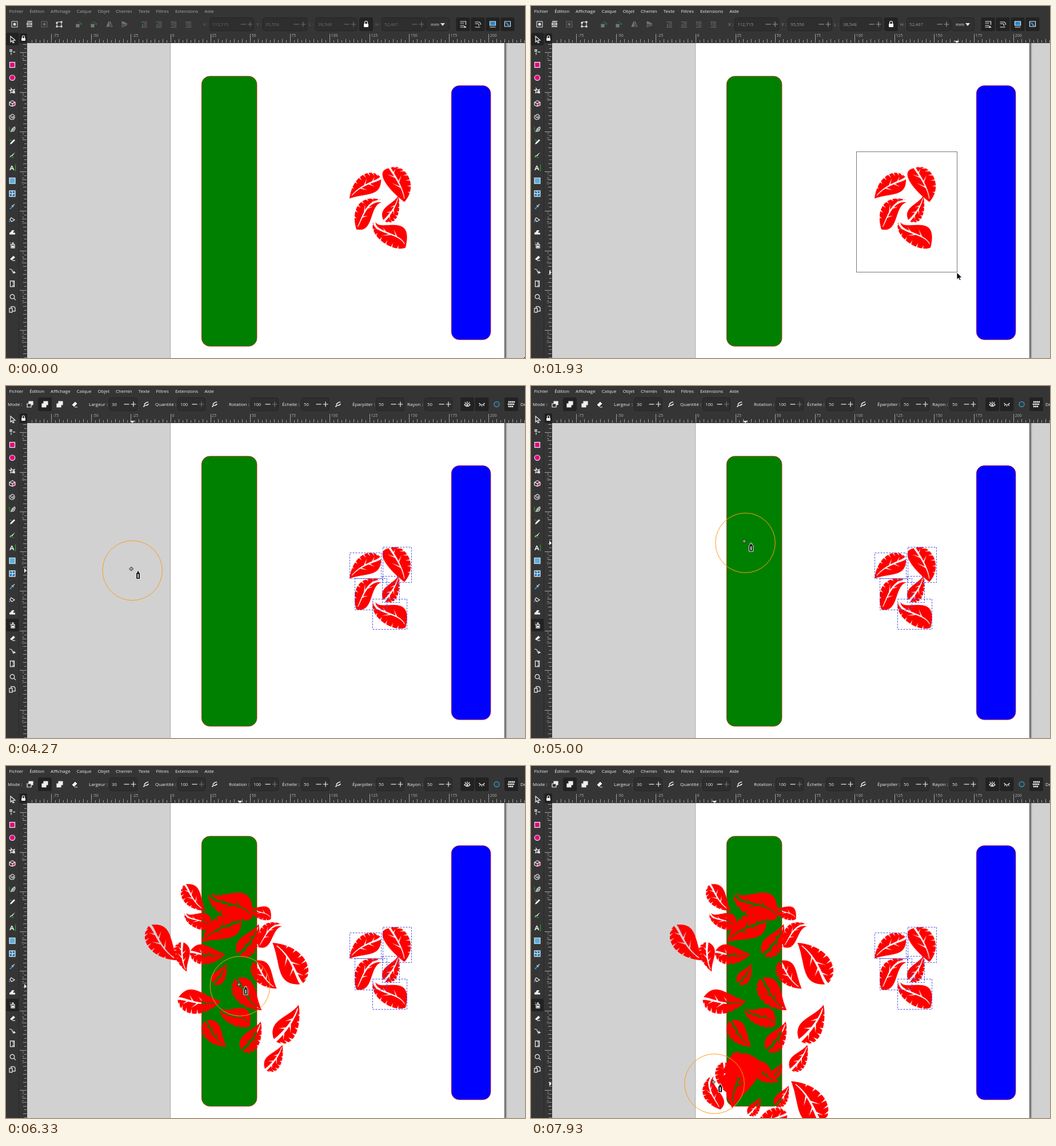
An HTML page with a canvas for the animation above (8000 ms loop, 908 px wide and 617 px high).

```html
<!DOCTYPE html>
<html lang="fr">
<head>
<meta charset="utf-8">
<title>Pulvérisation de feuilles</title>
<style>
html, body { margin: 0; width: 100%; height: 100%; overflow: hidden; background: #353535; }
canvas { display: block; width: 908px; height: 617px; }
</style>
</head>
<body>
<canvas id="stage" width="908" height="617"></canvas>
<script>
const g = document.getElementById('stage').getContext('2d');
const LOOP = 8000, STEP = 1000 / 15;
const FOCUS = 930, DRAG = 1000, SELECT = 2050, SPRAY = 3860;
const MM = 2.781, PAGE_X = 288, PAGE_Y = 11.5;
const LIGHT = '#efefef', DARK = '#222', BAR = '#353535', RED = '#ff0000';
const PINK = '#e5007d', BLUE = '#2f9be8', GREEN = '#25a525';

const mix = (a, b, u) => [a[0] + (b[0] - a[0]) * u, a[1] + (b[1] - a[1]) * u];
function bezier([a, b, c, d], t) {
  const p = mix(a, b, t), q = mix(b, c, t), r = mix(c, d, t);
  return mix(mix(p, q, t), mix(q, r, t), t);
}
let seed = 7;
const random = () => (seed = seed * 16807 % 2147483647) / 2147483647;

// A leaf is two curves from base to tip: a serrated edge and a smooth one.
function makeLeaf(base, e1, e2, tip, s1, s2) {
  const edge = [base, e1, e2, tip], smooth = [base, s1, s2, tip];
  const rib = [base, mix(e1, s1, .5), mix(e2, s2, .5), tip];
  const points = [edge, smooth].flatMap(c => Array.from({ length: 41 }, (_, i) => bezier(c, i / 40)));
  const xs = points.map(p => p[0]), ys = points.map(p => p[1]);
  const x = Math.min(...xs), y = Math.min(...ys), w = Math.max(...xs) - x, h = Math.max(...ys) - y;
  const center = [x + w / 2, y + h / 2];

  const art = document.createElement('canvas'), c = art.getContext('2d');
  art.width = art.height = 320;
  c.scale(4, 4);
  c.translate(40 - center[0], 40 - center[1]);
  c.fillStyle = RED;
  c.beginPath();
  c.moveTo(...base);
  c.bezierCurveTo(...e1, ...e2, ...tip);
  c.bezierCurveTo(...s2, ...s1, ...base);
  c.fill();
  c.globalCompositeOperation = 'destination-out';

  const wedge = (from, to, width) => {
    const len = Math.hypot(to[0] - from[0], to[1] - from[1]);
    const nx = (from[1] - to[1]) / len * width / 2, ny = (to[0] - from[0]) / len * width / 2;
    c.beginPath();
    c.moveTo(from[0] + nx, from[1] + ny);
    c.lineTo(...to);
    c.lineTo(from[0] - nx, from[1] - ny);
    c.fill();
  };
  for (let t = .14; t < .9; t += .115)
    wedge(mix(bezier(rib, t), bezier(edge, t), 1.12), mix(bezier(edge, t - .02), bezier(rib, t - .02), .38), 2.8);
  for (let t = 0; t < .92; t += .02) {
    c.lineWidth = .7 + 3.6 * (1 - t);
    c.beginPath();
    c.moveTo(...bezier(rib, t));
    c.lineTo(...bezier(rib, t + .025));
    c.stroke();
  }
  for (let i = 0; i < 4; i++) {
    const t = .36 + i * .11;
    wedge(bezier(rib, t), mix(bezier(rib, t - .13), bezier(i % 2 ? smooth : edge, t - .13), .55), 2.2);
  }
  return { art, center, box: [x, y, w, h] };
}
const LEAVES = {
  A: makeLeaf([656,301], [640,281], [606,296], [601,337.5], [658,336], [630,327]),
  B: makeLeaf([672,284], [694,272], [725,312], [697,343.5], [640,288], [672,325]),
  C: makeLeaf([666,344], [630,326], [600,346], [613,391.5], [632,338], [648,400]),
  D: makeLeaf([661,377], [686,389], [692,354], [686,333], [649,353], [676,349]),
  E: makeLeaf([646,372.5], [626,398], [676,434], [699,423.5], [643,404], [716,354])
};

// Pointer keys: time, x, y
const POINTER = [
  [0,906,614], [870,569,256], [DRAG,569,256], [1530,763,430], [1930,745,467], [2070,745,467], [2470,448,372],
  [3200,28,389], [3400,13,412], [3870,12,416], [4530,360,262], [5000,375,275], [5270,380,245],
  [6330,409.5,385], [7000,402,568], [7270,440,575], [7600,375,505], [7930,321,557]];

function pointerAt(t) {
  const i = POINTER.findIndex(k => k[0] > t);
  if (i < 0) return POINTER[POINTER.length - 1].slice(1);
  const a = POINTER[i - 1], b = POINTER[i];
  return mix(a.slice(1), b.slice(1), (t - a[0]) / (b[0] - a[0]));
}

// Sprayed copies share a few headings; each spot is x, y, scale
const HEADINGS = [
  ['A', -95, [[327,231,.9], [271,310,1.2], [450,366,.95], [420,400,1.1], [363,469,.9]]],
  ['A', -143, [[350,331,.95], [335,414,1.15]]],
  ['A', 88, [[498,346,1.35], [488,590,1.4]]],
  ['A', -37, [[365,548,1.5]]],
  ['A', 4, [[378,284,1.2], [420,621,1]]],
  ['C', 6, [[465,297,.85]]],
  ['D', 142, [[312,333,1.05]]],
  ['D', 4, [[423,306,1.3], [373,365,.85], [428,475,1.22], [490,452,1.5], [468,512,1.05], [430,534,.6], [438,579,.85], [390,597,.75]]],
  ['E', -8, [[393,242,1.22], [336,270,.75], [445,256,.6], [401,438,.85]]]];
const spots = HEADINGS
  .flatMap(([kind, deg, list]) => list.map(([x, y, scale]) => ({ kind, deg, x, y, scale })))
  .sort((a, b) => a.y - b.y);
const firstPass = spots.filter(s => s.y < 530), secondPass = spots.filter(s => s.y >= 530);
firstPass.forEach((s, i) => s.born = 5260 + 1065 * i / (firstPass.length - 1));
secondPass.forEach((s, i) => s.born = 6700 + i * 145);

// The last stroke drops leaves under the brush.
const trail = Array.from({ length: 7 }, (_, i) => {
  const born = 7470 + i * 76, [x, y] = pointerAt(born);
  return { kind: 'ADCE'[i % 4], deg: -110 + random() * 60, x: x + random() * 16 - 8, y: y + random() * 20, scale: .8 + random() * .2, born };
});
const sprayed = [...spots, ...trail];

function box(x, y, w, h, r, fill, line, lw = 1) {
  g.beginPath();
  g.roundRect(x, y, w, h, r);
  if (fill) { g.fillStyle = fill; g.fill(); }
  if (line) { g.strokeStyle = line; g.lineWidth = lw; g.stroke(); }
}
function text(s, x, y, color = LIGHT, size = 8, weight = 400) {
  g.font = `${weight} ${size}px "Open Sans", "Noto Sans", sans-serif`;
  g.textBaseline = 'middle';
  g.fillStyle = color;
  g.fillText(s, x, y);
}
function icon(x, y, d, line, fill, lw = 1.2, deg = 0) {
  const p = new Path2D(d);
  g.save();
  g.translate(x, y);
  g.rotate(deg * Math.PI / 180);
  if (fill) { g.fillStyle = fill; g.fill(p); }
  if (line) { g.strokeStyle = line; g.lineWidth = lw; g.stroke(p); }
  g.restore();
}
const disc = r => `M${-r} 0a${r} ${r} 0 1 0 ${2 * r} 0a${r} ${r} 0 1 0 ${-2 * r} 0Z`;

function drawLeaf(kind, x, y, scale = 1, deg = 0) {
  g.save();
  g.translate(x, y);
  g.rotate(deg * Math.PI / 180);
  g.scale(scale, scale);
  g.imageSmoothingQuality = 'high';
  g.drawImage(LEAVES[kind].art, -40, -40, 80, 80);
  g.restore();
}

function drawPage() {
  g.fillStyle = '#d1d1d1';
  g.fillRect(37, 65, 871, 552);
  const shade = g.createLinearGradient(872, 0, 877, 0);
  shade.addColorStop(0, '#4a4a4a');
  shade.addColorStop(1, '#d1d1d1');
  g.fillStyle = shade;
  g.fillRect(872, 65, 5, 552);
  g.fillStyle = '#aaa';
  g.fillRect(287, 65, 1, 552);
  g.fillStyle = '#fff';
  g.fillRect(288, 65, 584, 552);
  box(342.2, 123, 96.8, 473.4, 14.5, '#008000', RED, .6);
  box(779.2, 139.5, 68.8, 445.5, 14, '#0000ff', RED, .6);
  for (const kind in LEAVES) drawLeaf(kind, ...LEAVES[kind].center);
}

function drawSelection(handles) {
  g.strokeStyle = '#4a55e0';
  g.lineWidth = 1;
  g.setLineDash([3, 2]);
  const boxes = Object.values(LEAVES).map(l => l.box.map(Math.round));
  for (const [x, y, w, h] of boxes) g.strokeRect(x + .5, y + .5, w, h);
  g.setLineDash([]);
  if (!handles) return;
  for (let i = -1; i <= 1; i++)
    for (let j = -1; j <= 1; j++)
      if (i || j)
        icon(655 + i * (j ? 57.5 : 60), 350.5 + j * (i ? 77.5 : 79.5),
          'M-5.5 0L-1.5 -4V-1.5H1.5V-4L5.5 0L1.5 4V1.5H-1.5V4Z', null, '#000', 1, Math.atan2(j, i) * 180 / Math.PI);
}

function drawRulers([px, py], marked) {
  g.fillStyle = BAR;
  g.fillRect(23, 47, 885, 18);
  g.fillRect(23, 65, 14, 552);
  g.fillStyle = '#a2a2a2';
  for (let i = -38; i < 92; i++) {
    const x = Math.round(PAGE_X + i * 2.5 * MM), y = Math.round(PAGE_Y + i * 2.5 * MM);
    const size = i % 10 === 0 ? 15 : i % 2 === 0 ? 6 : 4;
    if (x > 38) g.fillRect(x, 64 - size, 1, size);
    if (y > 65) g.fillRect(36 - Math.min(size, 12), y, Math.min(size, 12), 1);
  }
  for (let v = -75; v <= 200; v += 25) {
    text(String(v), PAGE_X + v * MM + 2.5, 52, '#b0b0b0', 7);
    if (v > 0) [...String(v)].forEach((ch, i) => text(ch, 28, PAGE_Y + v * MM + 5.5 + i * 8, '#a0a0a0', 6.5));
  }
  if (marked) {
    icon(px, 62, 'M-4 -1H4L0 3Z', null, LIGHT);
    icon(33, py, 'M-1 -4V4L3 0Z', null, LIGHT);
  }
  box(24, 48, 13, 17, 2, '#202020');
  icon(30.5, 57, 'M-2 -1V-3a2 2 0 0 1 4 0V-1', LIGHT);
  box(27, 56, 7, 5, 1, LIGHT);
}

// Tool buttons from top to bottom: line, fill, fill colour, accent line
const TOOLS = [
  ['M-3 -5L5 2L1 2.3L3 6L1 6.5L-1 3L-3 5Z'],
  ['M-4 -4h3v3h-3ZM1 0h4M-2 1v4'],
  ['M-4.5 -4.5h9v9h-9Z', 'M-4.5 -4.5h9v9h-9Z', PINK],
  [disc(4.7), disc(4.7), PINK],
  ['M-2 -4L0 -1L4 -2L2 1L4 4L0 3L-3 4L-2 1L-5 -1L-2 -1Z' + 'M1 1h3v3h-3Z', 'M1 1h3v3h-3Z', PINK],
  ['M0 -5L5 -2V3L0 5L-5 3V-2ZM-5 -2L0 0L5 -2M0 0V5', 'M0 0L5 -2V3L0 5Z', PINK],
  ['M0 0a1.5 1.5 0 0 1 2 2a3 3 0 1 1 1 -4a4.6 4.6 0 1 1 -7 0'],
  ['M-2 4L0 -1L4 -4L5 -2L3 3ZM0 2L3 -1', '', '', 'M-5 -4Q-5 2 -3 5'],
  ['', 'M-4 4L-3 1L3 -5L5 -3L-1 3Z', LIGHT, 'M-5 -3Q-3 -5 -1 -2'],
  ['M-2 1L-4 3', 'M5 -5L0 2L-2 1Z', LIGHT, 'M-5 4Q0 2 2 5'],
  ['', 'M-5 4L-1.5 -4H0L3.5 4H1.5L.8 2H-2.3L-3 4ZM-1.8 .5H.3L-.7 -2.3Z', LIGHT, 'M5.5 -6V6'],
  ['M-5 -5h10v10h-10Z', 'M-5 -5h10v10h-10Z', '#5aaee4'],
  ['M-5 -5h10v10h-10ZM-5 -1Q0 2 5 -1M-1 -5Q2 0 -1 5', 'M-5 -5h10v10h-10Z', '#1673b5'],
  ['M4 -4L1 -1M-1 -2L2 1', 'M0 -1L1 0L-3 5L-5 4Z', BLUE],
  ['M-2 -3L4 1L-1 4L-4 0Z', 'M-5 1Q-7 5 -4 5Q-3 4 -5 1Z', BLUE],
  ['', 'M-5 4V1Q-2 0 -1 -3Q2 -5 4 -2Q1 -2 2 1H5V4Z', LIGHT],
  ['M-2 -1h6v6h-6ZM0 -1v-3h2v3M-4 -4h1M-4 -1h1', 'M-1 1h4v3h-4Z', LIGHT],
  ['M0 4.5h5', 'M-4 2L2 -4L5 -1L-1 4Z', LIGHT],
  ['M-5 -3Q0 -3 0 0T4 3M2 0.5L5 3L1 4.5'],
  ['M-3.5 -5h7v10h-7ZM0 -3h3M1 0h2M0 3h3'],
  [disc(3.8) + 'M3 3L6 6'],
  ['M-5 -2h5v7h-5ZM-2 -2V-5H3L5 -3V3H0']];

function drawTools(spraying) {
  g.fillStyle = BAR;
  g.fillRect(0, 47, 23, 570);
  g.fillStyle = '#292929';
  g.fillRect(22, 47, 1, 570);
  box(0, spraying ? 408 : 47, 22, 22, 3, DARK);
  TOOLS.forEach(([line, fill, color, accent], i) => {
    const y = 58 + i * 22.57;
    if (fill) icon(11, y, fill, null, color);
    if (line) icon(11, y, line, LIGHT);
    if (accent) icon(11, y, accent, GREEN);
  });
}

function entry(x, right, value, color, plus = color) {
  box(x + .5, 20.5, right - x, 23, 4, '#2e2e2e', '#252525');
  text(value, x + 5, 32.5, color, 7.7);
  icon(right - 18, 32, 'M-4.5 0H4.5', color);
  icon(right - 6, 32, 'M-4.5 0H4.5M0 -4.5V4.5', plus);
}
function button(x, d, line = LIGHT, fill) {
  box(x - 12, 20, 24, 24, 3, DARK);
  icon(x, 32, d, line, fill);
}

function selectorBar(focused, active) {
  const main = focused ? LIGHT : '#dedede';
  const dim = active ? LIGHT : focused ? '#949494' : '#6a6a6a';
  const off = active ? '#d8d8d8' : '#777', green = active ? '#2bb52b' : '#2b7039';
  for (const [x, color] of [[15, main], [67, '#686868']]) {
    icon(x, 32, 'M-5 -5h10v10h-10Z', color, null, 1);
    icon(x, 32, disc(2.5), null, color);
  }
  icon(41, 32, 'M-4 -5H5M-4 -2H4V1H-4ZM-5 4H5', main, null, 1.5);
  icon(93, 32, 'M-4 -4h8v8h-8Z', main, null, 1);
  icon(93, 32, 'M-5.5 -1v-3h3v3ZM2.5 -2.5v-3h3v3ZM2.5 5.5v-3h3v3ZM-5.5 5.5v-3h3v3Z', null, main);
  for (const x of [128, 154]) {
    icon(x, 32, 'M-5 0h5v5h-5Z', off, off);
    icon(x, 32, 'M-3 -3Q2 -6 4 0M2 -1L4 1L5 -2', green);
  }
  for (const [x, deg] of [[181, 0], [207, 90]]) {
    icon(x, 32, 'M-1 -5V4H-5ZM1 -5V4H5Z', off, null, 1, deg);
    icon(x, 32, 'M-1 -5V4H-5Z', null, off, 1, deg);
  }
  for (let i = 0; i < 4; i++) {
    const x = 242 + i * 25.7;
    icon(x, 32, 'M-5 -4H5M-1 -1H5M-1 2H5M-5 5H5', off);
    icon(x, 32, i < 2 ? 'M-3 4V-1' : 'M-3 -3V2', green, null, 2);
  }
  [['X :', 345, 433, '112,715'], ['Y :', 438, 526, '95,556'], ['L :', 530, 614, '38,548'], ['H :', 646, 733, '52,467']]
    .forEach(([label, x, right, value]) => {
      text(label, x, 32.5, dim);
      entry(x + 11, right, value, dim);
    });
  button(630, 'M-2.5 -1V-3a2.5 2.5 0 0 1 5 0V-1', '#fff');
  box(626, 31, 8, 6, 1, '#fff');
  box(735.5, 20.5, 40, 23, 4, '#303030', '#252525');
  text('mm', 743, 32.5, main);
  icon(764, 32, 'M-4 -2H4L0 3Z', null, main);
  ['M-5 -5H5V1M-5 -2H2M-5 2H2M-5 5H4M2 3L5 5L2 6',
   'M-5 -4H1Q5 -4 5 1M-5 -1H0Q2 -1 2 3M-5 5H4',
   'M-5 -5H5V2H-5ZM-5 5H5',
   'M-5 -5H5V4H-5Z'].forEach((d, i) => button(799.5 + i * 26, d, main, i === 2 ? '#1e88d0' : null));
  icon(877.5, 32, 'M-4 -3H0L4 3H0Z', null, '#1e88d0');
}

function sprayBar() {
  const dim = '#767676';
  text('Mode :', 3, 32.5);
  box(56, 20, 24, 24, 3, DARK);
  [BAR, DARK, LIGHT].forEach((fill, i) => {
    icon(42 + i * 26, 32, 'M-2 -5H5V1H-2Z', LIGHT, LIGHT);
    icon(42 + i * 26, 32, 'M-5 -1H2V5H-5Z', LIGHT, i ? LIGHT : fill);
  });
  icon(120, 32, 'M-4 1L1 -4L4 -1L-1 4ZM0 5H5', LIGHT, LIGHT, 1);
  [['Largeur :', 145, 180, 229, '30'], ['Quantité :', 261, 300, 348, '100', dim], ['Rotation :', 390, 428, 476, '100', dim],
   ['Échelle :', 483, 516, 565, '50'], ['Éparpiller :', 606, 647, 696, '50'], ['Rayon :', 702, 732, 780, '50']]
    .forEach(([label, lx, x, right, value, plus]) => {
      text(label, lx, 32.5);
      entry(x, right, value, LIGHT, plus);
    });
  for (const x of [245, 365, 581])
    icon(x, 32, 'M-4 5Q-4 2 0 2Q4 1 4 -1M-3 1Q-2 -3 4 -4', LIGHT, null, 1.7);
  button(807, 'M-5 1Q0 -5 5 1Q0 6 -5 1ZM0 -5V-3M-4 -4L-3 -2M4 -4L3 -2');
  icon(807, 33, disc(1.6), null, LIGHT);
  button(832.5, 'M-5 -2Q0 4 5 -2M-3 1L-4 3M0 2V4M3 1L4 3');
  icon(858.5, 32, disc(4.5), '#4b8ba7', '#25424e', 1.4);
  box(872, 20, 24, 24, 3, DARK);
  for (let i = 0; i < 11; i++) icon(880 + i % 4 * 3 - (i > 3 && i < 8), 28 + Math.floor(i / 4) * 4, disc(1.4), null, LIGHT);
  text('Dé', 900, 32.5);
}

function drawBars(t) {
  g.fillStyle = BAR;
  g.fillRect(0, 0, 908, 47);
  let x = 5.5;
  for (const name of ['Fichier', 'Édition', 'Affichage', 'Calque', 'Objet', 'Chemin', 'Texte', 'Filtres', 'Extensions', 'Aide']) {
    text(name, x, 9.5, t < FOCUS ? '#a9a9a9' : LIGHT);
    x += g.measureText(name).width + 11;
  }
  if (t < SPRAY) selectorBar(t >= FOCUS, t >= SELECT);
  else sprayBar();
}

function drawPointer(t, [x, y], onPage) {
  if (t >= SPRAY && onPage) {
    icon(x - 2, y - 3, 'M-3.5 0H3.5M0 -3.5V3.5', '#111', null, 2.6);
    icon(x - 2, y - 3, 'M-3 0H3M0 -3V3', '#eee', null, 1);
    icon(x + 10, y + 8, 'M-3.5 7V-3L-1.5 -5V-7.5H1.5V-5L3.5 -3V7Z', '#eee', '#111', 1);
    icon(x + 10, y + 8, 'M-1 -2H1V5H-1Z', null, '#ddd');
  } else if (t < SPRAY && x > 22 && x < 38) {
    icon(x, y, 'M-6.5 0L-3 -3V-1H3V-3L6.5 0L3 3V1H-3V3Z', '#fff', '#000', .8);
  } else {
    icon(x, y, 'M0 0V12.5L3 9.7L5 14L7 13L5 9H9Z', '#fff', '#000', .8);
  }
}

function draw(t) {
  const p = pointerAt(t), [x, y] = p;
  const onPage = x > 37 && y > 65;
  g.save();
  g.beginPath();
  g.rect(37, 65, 871, 552);
  g.clip();
  drawPage();
  for (const s of sprayed)
    if (t >= s.born) drawLeaf(s.kind, s.x, s.y, s.scale, s.deg);
  if (t >= SELECT) drawSelection(t < SPRAY);
  if (t > DRAG && t < SELECT) {
    g.strokeStyle = '#777';
    g.lineWidth = 1;
    g.strokeRect(569.5, 255.5, Math.round(x - 569), Math.round(y - 256));
  }
  if (t >= SPRAY && onPage) icon(x, y, disc(52.3), '#ff9a1a', null, 1);
  g.restore();
  drawRulers(p, onPage && t > 60);
  drawTools(t >= SPRAY);
  drawBars(t);
  drawPointer(t, p, onPage);
}

const start = performance.now();
function tick() {
  const t = (performance.now() - start) % LOOP;
  draw(Math.floor((t + 4) / STEP) * STEP);
  requestAnimationFrame(tick);
}
tick();
</script>
</body>
</html>
```
